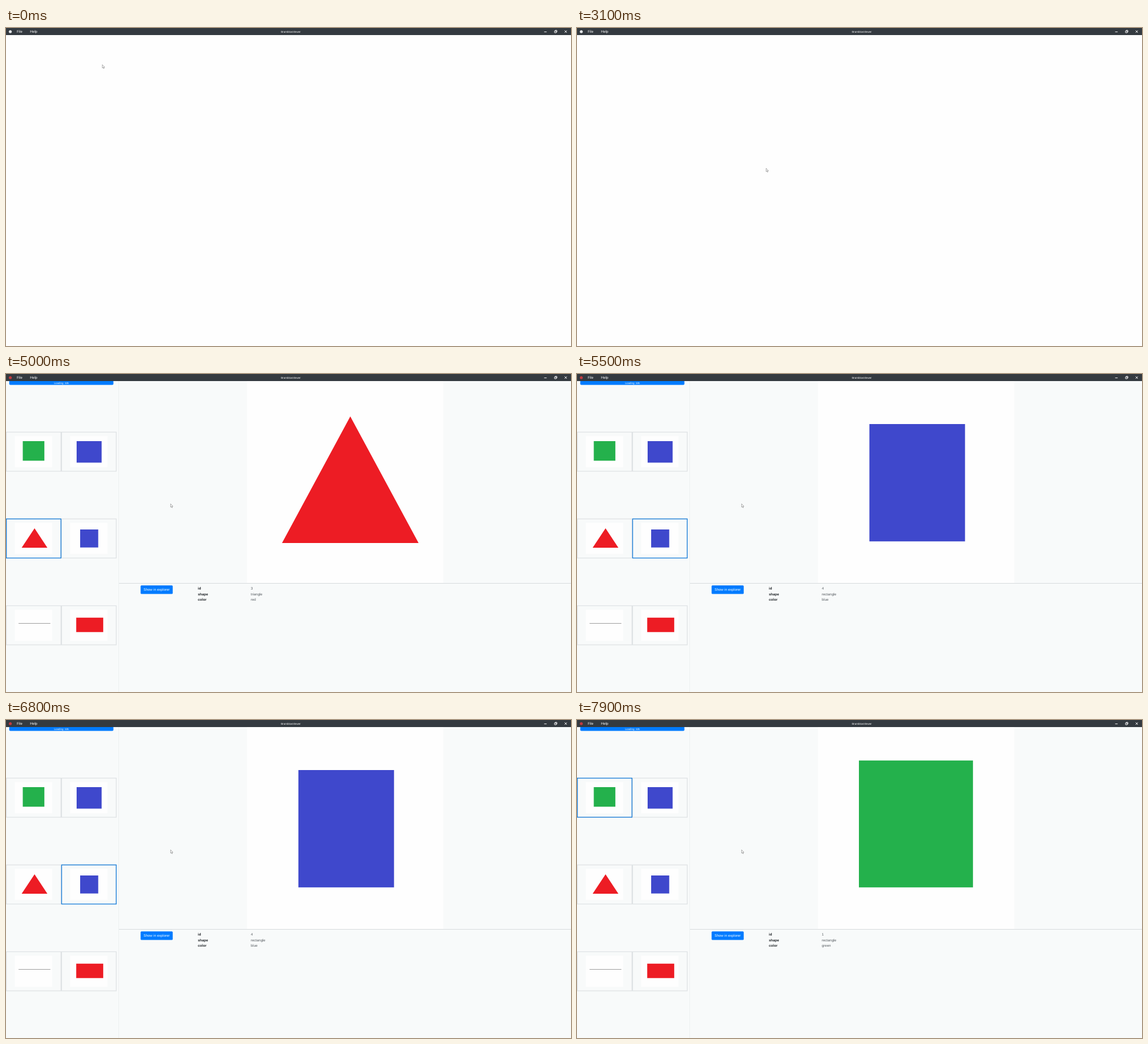
An HTML page for the animation above (8.1 s loop, 960x540 px).

```html
<!DOCTYPE html>
<html lang="en">
<head>
<meta charset="utf-8">
<title>BramblowViewer</title>
<style>
html, body { margin: 0; width: 100%; height: 100%; overflow: hidden; background: #fefefe; }
svg { display: block; width: 960px; height: 540px; }
text { font: 6px "Liberation Sans", Arial, sans-serif; text-rendering: geometricPrecision; }
.small { font-size: 4.5px; }
.light { fill: #fff; }
.mid { text-anchor: middle; }
.key { font-weight: bold; fill: #212529; }
.val { fill: #565c61; }
.icon { fill: none; stroke: #fff; stroke-width: .9; }
</style>
</head>
<body>
<svg viewBox="0 0 960 540">
  <rect width="960" height="540" fill="#fefefe"/>
  <g id="app">
    <rect y="12" width="960" height="528" fill="#f8fafa"/>
    <path d="M191.5 12V540" stroke="#edf0f1"/>
    <path d="M192 355.5H960" stroke="#d8dcde"/>
    <rect x="409.5" y="12" width="333.5" height="343" fill="#fefefe"/>
    <rect x="5.5" y="11" width="177" height="7.6" rx="1.8" fill="#007bff"/>
    <text class="small light mid" x="94" y="16.9">Loading: 6/6</text>
    <g id="cells"></g>
    <rect id="focus" width="92.8" height="66.4" fill="none" stroke="#1a7fdb" stroke-width="1.3"/>
    <g id="big"></g>
    <rect x="228.7" y="359" width="54.6" height="14.5" rx="1.6" fill="#007bff"/>
    <text class="light mid" x="256" y="368.3">Show in explorer</text>
    <g id="info"></g>
  </g>
  <rect width="960" height="12" fill="#343a40"/>
  <circle id="logo" cx="7.3" cy="6.2" r="2.5"/>
  <text class="light" x="18.2" y="8">File</text>
  <text class="light" x="40.8" y="8">Help</text>
  <text class="small light mid" x="484" y="7.6">BramblowViewer</text>
  <path class="icon" d="M914.4 6.6h4.2M932 5h3v3h-3zM933 5v-1h3v3h-1M949.2 4.2l3.8 3.8M953 4.2l-3.8 3.8"/>
  <path id="mouse" d="M0 0V5.6L1.3 4.5L2.2 6.6L3.1 6.2L2.2 4.2H4Z" fill="#fff" stroke="#777" stroke-width=".6"/>
</svg>
<script>
const LOOP = 8100, STEP = 100, LOADED = 3500;
const $ = id => document.getElementById(id);
const GREEN = "#24b14c", BLUE = "#3f48cc", RED = "#ed1c24";

const box = (x, y, r, b) => `M${x} ${y}H${r}V${b}H${x}Z`;

// each item: thumbnail path, preview path, fill, shape and colour labels
const items = [
  [box(28.5, 114, 65.2, 147.3), box(479, 68.8, 672.8, 284.2), GREEN, "rectangle", "green"],
  [box(120, 114, 162.5, 150.6), box(466.5, 68.8, 690.2, 305.2), BLUE, "rectangle", "blue"],
  ["M48.5 262L70.3 295H26.6Z", "M585 72L701 287H469Z", RED, "triangle", "red"],
  [box(126, 264, 156.7, 294.6), box(496.8, 85, 659.3, 284.2), BLUE, "rectangle", "blue"],
  [box(21.3, 423.1, 75.4, 423.6), box(442, 161, 728, 163.4), "#444", "line", "black"],
  [box(119.3, 413.8, 165.2, 438.2), box(463, 101.8, 703.7, 261.2), RED, "triangle", "red"]
];

// [time, selected item]
const picks = [[3500, 0], [3800, 1], [4400, 0], [4900, 2], [5400, 3],
  [5900, 4], [6300, 5], [6800, 3], [7200, 1], [7600, 0]];

// [time, x, y] of the pointer tip
const trail = [[0, 163.7, 62.3], [700, 163.7, 62.3], [800, 71, 51.3], [1300, 71, 51.3],
  [1700, 23, 5], [1900, 25, 8], [2200, 45, 30], [3100, 321.3, 238.2],
  [3200, 319, 260.5], [3300, 279.7, 220.5], [LOOP, 279.7, 220.5]];

const spot = i => [.6 + i % 2 * 93.9, 98.7 + (i >> 1) * 147.4];

$("cells").innerHTML = items.map(([thumb, , fill], i) => {
  const [x, y] = spot(i);
  return `<rect x="${x}" y="${y}" width="92.8" height="66.4" fill="none" stroke="#dee2e4" stroke-width="1.2"/>
    <rect x="${x + 14.4}" y="${y + 6.6}" width="63.5" height="53" fill="#fefefe"/>
    <path d="${thumb}" fill="${fill}"/>`;
}).join("");

function select(i) {
  const [, preview, fill, shape, color] = items[i];
  const [x, y] = spot(i);
  $("focus").setAttribute("x", x);
  $("focus").setAttribute("y", y);
  $("big").innerHTML = `<path d="${preview}" fill="${fill}"/>`;
  $("info").innerHTML = [["id", i + 1], ["shape", shape], ["color", color]].map(([key, val], row) => {
    const base = 365.9 + row * 9.7;
    return `<text class="key" x="326" y="${base}">${key}</text><text class="val" x="416" y="${base}">${val}</text>`;
  }).join("");
}

function pointer(t) {
  const n = trail.findIndex(p => p[0] > t);
  const [t0, x0, y0] = trail[n - 1], [t1, x1, y1] = trail[n];
  const k = (t - t0) / (t1 - t0);
  return [x0 + (x1 - x0) * k, y0 + (y1 - y0) * k];
}

let last = -1, shown = -1;

function draw(now) {
  const t = Math.floor(now % LOOP / STEP) * STEP;
  if (t !== last) {
    last = t;
    const loaded = t >= LOADED;
    $("app").style.display = loaded ? "" : "none";
    $("logo").setAttribute("fill", loaded ? "#c23a3f" : "#e4e6e8");
    $("mouse").setAttribute("transform", `translate(${pointer(t)})`);
    const pick = picks.filter(p => p[0] <= t).pop() || picks[0];
    if (pick[1] !== shown) select(shown = pick[1]);
  }
  requestAnimationFrame(draw);
}

const start = performance.now();
const tick = () => Math.max(0, performance.now() - start);
(function frame() {
  draw0(tick());
  requestAnimationFrame(frame);
})();

function draw0(ms) {
  const t = Math.floor(ms % LOOP / STEP) * STEP;
  if (t === last) return;
  last = t;
  const loaded = t >= LOADED;
  $("app").style.display = loaded ? "" : "none";
  $("logo").setAttribute("fill", loaded ? "#c23a3f" : "#e4e6e8");
  $("mouse").setAttribute("transform", `translate(${pointer(t)})`);
  const pick = picks.filter(p => p[0] <= t).pop() || picks[0];
  if (pick[1] !== shown) select(shown = pick[1]);
}
</script>
</body>
</html>
```
